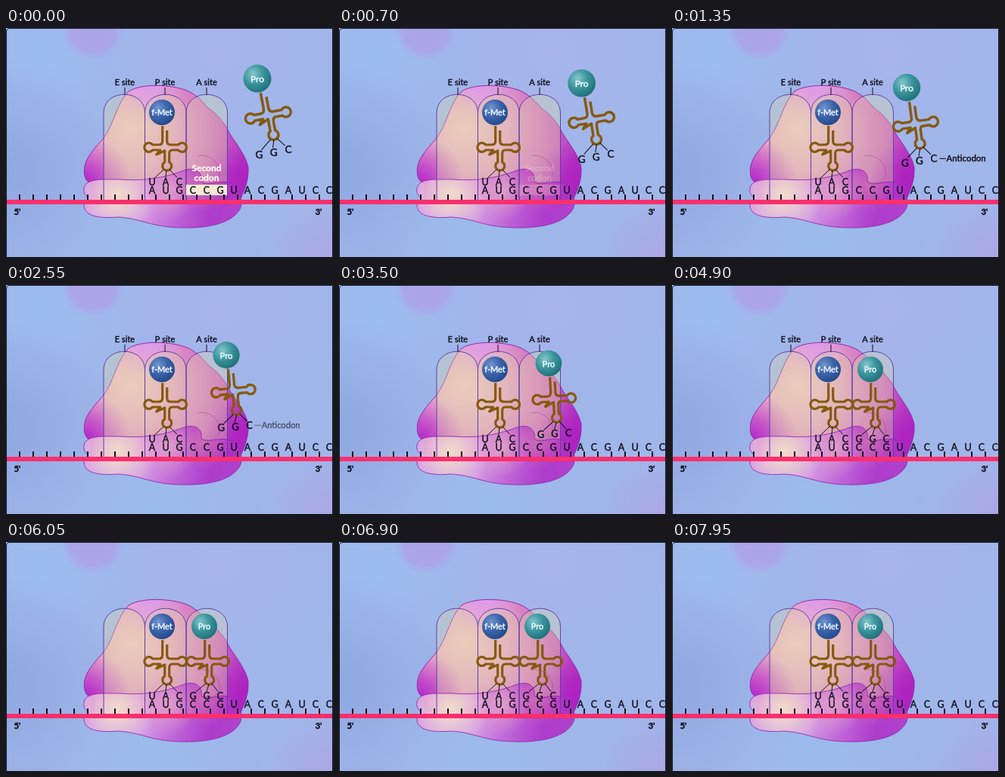
Write an HTML page with a canvas that moves like this. It is 432x304 px and loops after 8 s.

```html
<!DOCTYPE html>
<html lang="en">
<head>
<meta charset="utf-8">
<title>Translation: second codon</title>
<style>
html, body { margin: 0; width: 100%; height: 100%; overflow: hidden; background: #9eb7e8; }
canvas { display: block; width: 432px; height: 304px; }
</style>
</head>
<body>
<canvas id="stage" width="432" height="304"></canvas>
<script>
const W = 432, H = 304, LOOP = 8000;
const ctx = document.getElementById('stage').getContext('2d');
const INK = '#10101e', OUTLINE = '#5f3fa8', BROWN = '#86590f';

const upper = new Path2D(`M113 207C104 203 102 195 104 183C107 169 120 157 129 146
  C143 127 147 98 162 84C180 73 218 75 239 83C253 89 260 99 268 107
  C285 119 291 131 296 141C306 156 317 170 320 185C321 203 314 219 306 234H112Z`);
const lower = new Path2D(`M103 213C105 199 128 201 150 201C190 204 217 196 235 189
  C250 184 260 191 258 204C268 213 286 197 300 209C313 221 313 235 308 242
  C295 262 260 266 230 265C190 264 180 253 148 251C123 253 104 250 103 236
  C102 230 110 230 107 224C103 220 102 217 103 213Z`);
const fold = new Path2D('M254 170C266 166 284 178 282 194C281 207 268 207 258 204');
const rna = new Path2D(`M0 18V38Q0 43-5 43H-13A6 6 0 1 0-13 50H-3L-8 56L3 51V66
  A6 6 0 1 0 9 66V55Q9 50 13 50H21A6 6 0 1 0 21 43H11Q6 43 6 38V24`);
const sites = [['E', 129, 157], ['P', 183.5, 210], ['A', 238, 265]];

// time, x, y, tilt in degrees, scale of the arriving carrier
const flight = [
  [0, 332, 67, -10.6, 1.09], [1350, 310, 79, -8, 1.07], [2550, 291, 93, -5.3, 1.04],
  [3500, 277, 104, -3, 1.02], [4500, 262, 112, 0, 1]
];

const ramp = (t, a, b) => Math.min(1, Math.max(0, (t - a) / (b - a)));

function pose(t) {
  const i = Math.min(flight.length - 2, flight.findLastIndex(k => k[0] <= t));
  const a = flight[i], b = flight[i + 1], u = ramp(t, a[0], b[0]);
  return a.slice(1).map((v, n) => v + (b[n + 1] - v) * u);
}

function radial(x, y, r, ...colors) {
  const g = ctx.createRadialGradient(x, y, 0, x, y, r);
  colors.forEach((c, i) => g.addColorStop(i / (colors.length - 1), c));
  return g;
}

function glow(x, y, r, color) {
  ctx.fillStyle = radial(x, y, r, color, color + '00');
  ctx.fillRect(x - r, y - r, 2 * r, 2 * r);
}

// A hairline stroke gives the type its medium weight.
function text(s, x, y, size = 12, color = INK, weight = 400, align = 'center') {
  ctx.font = `${weight} ${size}px Lato, sans-serif`;
  ctx.textAlign = align;
  ctx.fillStyle = ctx.strokeStyle = color;
  ctx.lineWidth = 0.4;
  ctx.fillText(s, x, y + size * 0.36);
  ctx.strokeText(s, x, y + size * 0.36);
}

function line(x1, y1, x2, y2, color = INK, width = 1) {
  ctx.strokeStyle = color;
  ctx.lineWidth = width;
  ctx.beginPath();
  ctx.moveTo(x1, y1);
  ctx.lineTo(x2, y2);
  ctx.stroke();
}

function faded(alpha, draw) {
  if (alpha <= 0) return;
  ctx.globalAlpha = alpha;
  draw();
  ctx.globalAlpha = 1;
}

function paint(path, fill, stroke, glows) {
  ctx.fillStyle = fill;
  ctx.fill(path);
  ctx.save();
  ctx.clip(path);
  glows.forEach(g => glow(...g));
  ctx.restore();
  ctx.strokeStyle = stroke;
  ctx.lineWidth = 1;
  ctx.stroke(path);
}

function background() {
  ctx.fillStyle = '#a0b5e9';
  ctx.fillRect(0, 0, W, H);
  glow(50, 35, 140, '#9dbdf0');
  glow(0, 190, 150, '#8fa8e1');
  glow(190, 300, 150, '#9bbcec');
  glow(280, 30, 150, '#a7b5ec');
  glow(400, 180, 130, '#a1b7ea');
  glow(425, 300, 75, '#aca8e5');
  ctx.fillStyle = radial(115, 2, 44, '#aca4e9', '#aca4e9', '#aba5e9', '#a5b2ec00');
  ctx.fillRect(60, 0, 110, 60);
}

function border() {
  ctx.strokeStyle = '#10131f';
  ctx.lineWidth = 1;
  ctx.beginPath();
  ctx.moveTo(0.5, H);
  ctx.lineTo(0.5, 5);
  ctx.quadraticCurveTo(0.5, 0.5, 5, 0.5);
  ctx.lineTo(W - 0.5, 0.5);
  ctx.lineTo(W - 0.5, H);
  ctx.stroke();
}

function ribosome() {
  paint(upper, radial(165, 135, 165, '#eec6c6', '#e4a5c6', '#cf6cc2', '#ae28c2'), '#8f2bad', [
    [107, 203, 58, '#b52bca'], [190, 72, 48, '#dd9bee'], [312, 200, 50, '#ad22c0']
  ]);

  const columns = sites.map(([, x]) => {
    const p = new Path2D();
    p.moveTo(x, 229);
    p.lineTo(x, 113);
    p.bezierCurveTo(x, 80, x + 54.5, 80, x + 54.5, 113);
    p.lineTo(x + 54.5, 229);
    return p;
  });
  ctx.fillStyle = 'rgba(224,218,168,.33)';
  columns.forEach(p => ctx.fill(p));
  faded(0.88, () => paint(lower,
    radial(140, 232, 175, '#e6b2e4', '#dd97e3', '#c458d4', '#b02ac8', '#b234c8'), '#8f2bad',
    [[148, 221, 52, '#f2e2c6'], [215, 215, 40, '#e2a5c8'], [262, 208, 36, '#cf72b4']]));
  ctx.lineWidth = 1;
  ctx.strokeStyle = '#a8409a88';
  ctx.stroke(fold);
  ctx.strokeStyle = OUTLINE;
  columns.forEach(p => ctx.stroke(p));
}

function messenger(secondCodon) {
  faded(secondCodon, () => {
    ctx.fillStyle = '#f6ead2';
    ctx.fillRect(238, 208, 54, 14);
    text('Second', 265, 186, 12, '#fff8ef', 700);
    text('codon', 265, 199, 12, '#fff8ef', 700);
  });
  for (let x = 18; x < W; x += 18) line(x, 221, x, 228, INK, 2);
  [...'AUGCCGUACGAUCC'].forEach((c, i) => text(c, 193 + 18 * i, 215.5, 12.5));
  ctx.fillStyle = '#fb2f6c';
  ctx.fillRect(0, 228, W, 6);
  text("5'", 15, 244, 11.5, INK, 700);
  text("3'", 413, 244, 11.5, INK, 700);
}

function carrier([x, y, tilt, scale], name, colors, bases, firstBase, label = 0) {
  const angle = tilt * Math.PI / 180;
  ctx.save();
  ctx.translate(x, y);
  ctx.scale(scale, scale);
  ctx.rotate(angle);
  ctx.lineJoin = 'round';
  ctx.strokeStyle = BROWN;
  ctx.lineWidth = 3.2;
  ctx.save();
  ctx.translate(0.7, 0);
  ctx.stroke(rna);
  ctx.restore();
  [[2, 76, firstBase + 4], [6, 77, firstBase + 18], [10, 76, firstBase + 33]]
    .forEach(([x1, y1, x2]) => line(x1, y1, x2, 86.5));
  [...bases].forEach((c, i) => {
    ctx.save();
    ctx.translate(firstBase + 18 * i, 92);
    ctx.rotate(-angle);
    text(c, 0, 0, 12.5);
    if (i === 2) faded(label, () => {
      line(7, 0, 15, 0);
      text('Anticodon', 15.5, 0, 10.7, INK, 400, 'left');
    });
    ctx.restore();
  });
  ctx.rotate(-angle);
  ctx.fillStyle = radial(-5, -6, 24, ...colors);
  ctx.beginPath();
  ctx.arc(0, 0, 17, 0, 7);
  ctx.fill();
  text(name, 0, 0.5, 11, '#f4fbff');
  ctx.restore();
}

function render(t) {
  background();
  ribosome();
  faded(1 - ramp(t, 5350, 5750), () => sites.forEach(([letter, , x]) => {
    text(letter + ' site', x, 72, 11);
    line(x, 79, x, 89);
  }));
  messenger(1 - ramp(t, 300, 800));
  carrier([206, 112, 0, 1], 'f-Met', ['#7396cf', '#3d65ab', '#234a8c'], 'UAC', -13);
  const label = ramp(t, 850, 1250) * (1 - ramp(t, 2350, 2750));
  carrier(pose(t), 'Pro', ['#83c6cb', '#3b969d', '#20717a'], 'GGC', -15, label);
  border();
}

function frame(now) {
  render(now % LOOP);
  requestAnimationFrame(frame);
}
requestAnimationFrame(frame);
</script>
</body>
</html>
```
